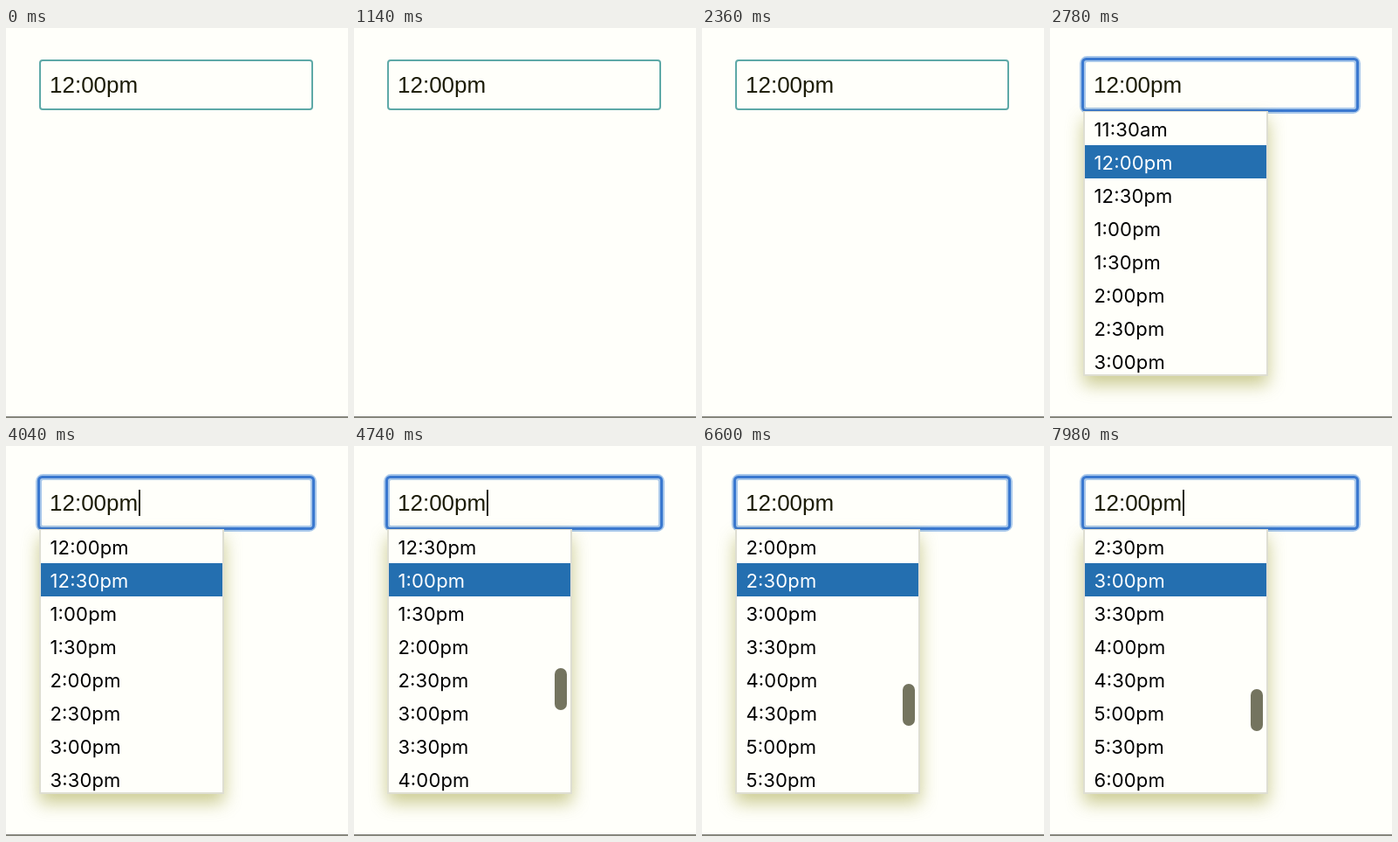
Recreate the animation shown at these times as an HTML page. Size 392 by 446 pixels, loop 8 s.

```html
<!DOCTYPE html>
<html lang="en">
<head>
<meta charset="utf-8">
<title>Time picker</title>
<style>
  html, body { margin: 0; width: 100%; height: 100%; overflow: hidden; background: #fffffa; }
  svg { display: block; }
  #value { font: 26px "Liberation Sans", Arial, sans-serif; fill: #1c1c08; }
  #rows { font: 22px Inter, Roboto, sans-serif; letter-spacing: .15px; font-feature-settings: "calt"; fill: #000; }
  #panel { filter: drop-shadow(0 10px 10px rgba(130, 130, 0, .42)); }
</style>
</head>
<body>
<svg width="392" height="446" viewBox="0 0 392 446">
  <defs><clipPath id="view"><rect x="40" y="96" width="208" height="300"/></clipPath></defs>
  <rect y="444" width="392" height="2" fill="#85857c"/>
  <rect x="39" y="37" width="312" height="56" rx="3" fill="#fffffa" stroke="#5ea9a7" stroke-width="2"/>
  <g id="ring" fill="none">
    <rect x="37.5" y="35.5" width="315" height="59" rx="5" stroke="#a9c8ea" stroke-width="7"/>
    <rect x="37.5" y="35.5" width="315" height="59" rx="4" stroke="#3a78cf" stroke-width="3"/>
  </g>
  <text id="value" x="50" y="74">12:00pm</text>
  <rect id="caret" x="152" y="50" width="2" height="30" fill="#1c1c08"/>
  <g id="list">
    <rect id="panel" x="38" y="95" width="212" height="303" fill="#deded2"/>
    <rect x="40" y="96" width="208" height="300" fill="#fffffa"/>
    <rect x="40" y="134" width="208" height="38" fill="#246fb0"/>
    <g id="rows" clip-path="url(#view)"></g>
    <rect id="thumb" x="230" width="14" height="48" rx="7" fill="#74745f"/>
  </g>
</svg>
<script>
const LOOP = 8000, OPEN = 2660, ROW = 38;
const presses = [4040, 4640, 5340, 6020, 6600, 7580];
const $ = id => document.getElementById(id);
const show = (id, opacity) => $(id).setAttribute('opacity', opacity);

const rows = Array.from({ length: 8 }, (_, i) => {
  const row = document.createElementNS('http://www.w3.org/2000/svg', 'text');
  row.setAttribute('x', 50.5);
  row.setAttribute('y', 124 + i * ROW);
  if (i === 1) row.setAttribute('fill', '#fff');
  return $('rows').appendChild(row);
});

// Label of the n-th half hour after midnight
function label(n) {
  const hour = Math.floor(n / 2);
  return `${hour % 12 || 12}:${n % 2 ? '30' : '00'}${hour < 12 ? 'am' : 'pm'}`;
}

function draw(t) {
  const first = 23 + presses.filter(p => t >= p).length;
  rows.forEach((row, i) => row.textContent = label(first + i));
  $('thumb').setAttribute('y', 248 + 6 * (first - 24));
  show('thumb', Math.min(1, Math.max(0, (t - 4060) / 200)));
  show('list', t >= OPEN ? 1 : 0);
  show('ring', t < OPEN ? 0 : t < 2780 ? .6 : 1);
  show('caret', t >= 4040 && t < 5400 || t >= 6860 ? 1 : 0);
}

const start = performance.now();
function tick() {
  draw((performance.now() - start) % LOOP);
  requestAnimationFrame(tick);
}
tick();
</script>
</body>
</html>
```
